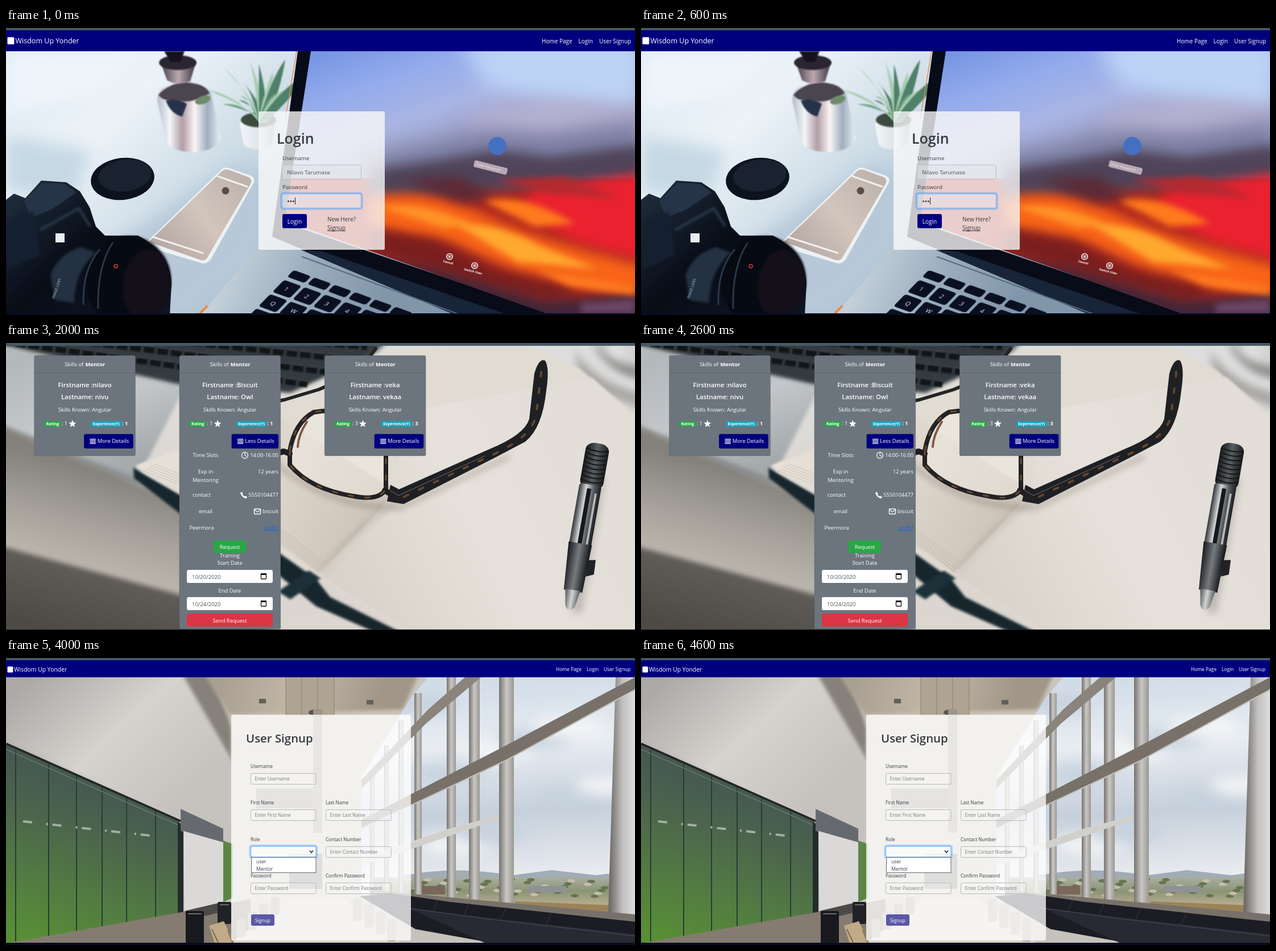
Write an HTML page with a canvas that moves like this. It is 1106 px wide and 506 px high and loops after 5000 ms.

```html
<!DOCTYPE html>
<html lang="en">
<head>
<meta charset="utf-8">
<title>Mentoring portal tour</title>
<style>
html, body { margin: 0; width: 100%; height: 100%; overflow: hidden; background: #000; }
canvas { display: block; width: 1106px; height: 506px; }
</style>
</head>
<body>
<canvas id="stage" width="1106" height="506"></canvas>
<script>
const W = 1106, H = 506, HOLD = 1000;
const NAVY = '#00007f', INK = '#343a40', GREY = '#6c757d', BLUE = '#80bdff';
const APP = 'Wisdom Up Yonder';
const MENTORS = [
  { first: 'nilavo', last: 'nivu', skill: 'Angular', rate: 1, exp: 1 },
  { first: 'Biscuit', last: 'Owl', skill: 'Angular', rate: 1, exp: 1 },
  { first: 'veka', last: 'vekaa', skill: 'Angular', rate: 3, exp: 3 }
];
let g;

// Drawing helpers
function fill(d, color) { g.fillStyle = color; g.fill(new Path2D(d)); }
function line(d, color, width = 1) {
  g.strokeStyle = color; g.lineWidth = width; g.stroke(new Path2D(d));
}
function rect(x, y, w, h, color) { g.fillStyle = color; g.fillRect(x, y, w, h); }
function box(x, y, w, h, r, color, edge, width = 1) {
  g.beginPath(); g.roundRect(x, y, w, h, r);
  if (color) { g.fillStyle = color; g.fill(); }
  if (edge) { g.strokeStyle = edge; g.lineWidth = width; g.stroke(); }
}
function oval(x, y, rx, ry, color, turn = 0) {
  g.beginPath(); g.ellipse(x, y, rx, ry, turn, 0, 7);
  g.fillStyle = color; g.fill();
}
function ramp(x0, y0, x1, y1, ...colors) {
  const r = g.createLinearGradient(x0, y0, x1, y1);
  colors.forEach((c, i) => r.addColorStop(i / (colors.length - 1), c));
  return r;
}
function soft(radius, draw) {
  g.save(); g.filter = `blur(${radius}px)`; draw(); g.restore();
}
function inside(d, draw) { g.save(); g.clip(new Path2D(d)); draw(); g.restore(); }
function text(s, x, y, size, color = '#fff', align = 'left', weight = 400) {
  g.font = `${weight} ${size}px "Open Sans", "Noto Sans", sans-serif`;
  g.textAlign = align; g.fillStyle = color; g.fillText(s, x, y);
}
function chevron(x, y) { line(`M${x - 3} ${y - 2}l3 3.5l3-3.5`, '#343a40', 1.8); }
function focus(x, y, w, h, color) {
  box(x - 1.5, y - 1.5, w + 3, h + 3, 4, null, 'rgba(0,123,255,.3)', 3);
  box(x, y, w, h, 3, color, BLUE, 1.3);
}

// Shared page parts
function frameEdges(top, bottom = 503) {
  rect(0, 0, W, top, '#455a64');
  rect(0, bottom, W, H - bottom, '#080d20');
}
function nav(top, bottom, size, x, base) {
  rect(0, top, W, bottom - top, NAVY);
  box(2.5, base - size * .86, size * .95, size, 1.5, '#fff');
  text(APP, x, base, size);
}
function links(size, base, ...xs) {
  ['Home Page', 'Login', 'User Signup'].forEach((s, i) => text(s, xs[i], base, size));
}
function welcome(size, y1, size2, y2, ruleY, x0, x1) {
  text('Welcome to Wisdom up Yonder!', 553, y1, size, '#fff', 'center', 300);
  text('Select any Skill from the below Drop-Box', 554, y2, size2, '#fff', 'center', 600);
  rect(x0, ruleY, x1 - x0, 1, 'rgba(0,0,0,.12)');
}
function star(x, y, r) {
  g.beginPath();
  for (let i = 0; i < 10; i++) {
    const a = i * Math.PI / 5 - Math.PI / 2, q = i % 2 ? r * .42 : r;
    g.lineTo(x + q * Math.cos(a), y + q * Math.sin(a));
  }
  g.fillStyle = '#fff'; g.fill();
}
function mentorCard(x, y, scale, m, h = 187, label = 'More Details') {
  g.save(); g.translate(x, y); g.scale(scale, scale);
  box(0, 0, 189, h, 3, GREY, 'rgba(0,0,0,.12)');
  rect(0, 32, 189, 1, 'rgba(0,0,0,.15)');
  text('Skills of', 57, 20, 10);
  text('Mentor', 95.5, 20, 10, '#fff', 'left', 700);
  text('Firstname :' + m.first, 94.5, 59, 12, '#fff', 'center', 600);
  text('Lastname: ' + m.last, 94.5, 82, 12, '#fff', 'center', 600);
  text('Skills Known: ' + m.skill, 94.5, 105, 10, '#fff', 'center');
  box(19, 122.5, 31, 11, 2, '#28a745');
  text('Rating', 34.5, 131, 7.4, '#fff', 'center', 700);
  text(': ' + m.rate, 51.5, 131, 9.8);
  star(71.5, 128, 7.4);
  box(106, 122.5, 57, 11, 2, '#17a2b8');
  text('Experience(Y)', 134.5, 131, 7.4, '#fff', 'center', 700);
  text(': ' + m.exp, 164, 131, 9.8, '#fff', 'left', 700);
  if (label) {
    const left = label[0] === 'L' ? 97.5 : 93;
    box(left, 147, 185 - left, 27, 3, NAVY);
    for (let i = 0; i < 4; i++) rect(left + 11, 156 + i * 2.7, 11, 1.4, '#fff');
    text(label, left + 25, 164, 10);
  }
  g.restore();
}

// Photo backdrops
function phoneDesk() {
  rect(0, 0, W, H, ramp(0, 60, 420, 500, '#dfeaf3', '#ecf3f8', '#cbdae5', '#a6bbcb'));
  soft(14, () => {
    fill('M0 40H250L160 120L0 150Z', '#edf4fa');
    fill('M180 390L400 240L470 260L450 400L330 506H270Z', '#b7c9d8');
    fill('M0 190L150 215L120 300L0 290Z', '#c6d8e4');
  });
  // Vase
  soft(1.2, () => {
    fill('M266 128Q266 102 300 95Q345 92 361 116L378 195Q370 218 325 219Q285 216 281 198Z',
      ramp(266, 0, 376, 0, '#b4bccb', '#f3f6fa', '#b19ca5', '#fbf5f5', '#9fadbf', '#e4eaf0'));
    fill('M268 118Q285 97 318 96Q350 98 358 115Q330 134 300 128Q276 130 268 118Z', '#4b4550');
    fill('M281 128Q300 122 318 134L310 156Q290 152 281 128Z', '#26314a');
    fill('M272 60Q300 42 334 60L324 94Q299 102 283 92Z', ramp(272, 0, 334, 0, '#423a48', '#bcaab0', '#383242'));
    oval(302, 61, 33, 13, '#2a2530');
    fill('M278 41H314L306 60H290Z', '#15121c');
    oval(346, 127, 14, 7, '#6d8c68', -.3);
  });
  // Plant
  soft(1, () => {
    fill('M411 168Q440 145 474 160L468 204Q442 224 418 206Z', ramp(410, 0, 474, 0, '#f5f7f8', '#dfe6ea', '#97a7b0'));
    oval(444, 162, 31, 13, '#3d4a3f');
    for (let i = 0; i < 15; i++) {
      const a = -2.85 + i * .15, r = 74 + 38 * Math.sin(i * 1.9);
      const x = 452 + r * Math.cos(a), y = 156 + r * Math.sin(a);
      fill(`M445 165Q${448 + r * .45 * Math.cos(a)} ${140 + r * .5 * Math.sin(a)} ${x} ${y}Q${463 + r * .5 * Math.cos(a)} ${152 + r * .4 * Math.sin(a)} 458 165Z`,
        ['#6fa184', '#a9cdb0', '#4f8069'][i % 3]);
    }
  });
  // Laptop screen
  fill('M513 41H540L494 345L966 506H862L516 388L468 368Z', '#080b18');
  line('M511 41L491 160', '#e98350', 1.3);
  inside('M536 41H1106V503H950L666 402L490 340Z', () => {
    rect(470, 40, 640, 230, ramp(560, 40, 640, 270, '#7695e2', '#93abec', '#a9b5e4', '#9a9cc0'));
    rect(470, 265, 640, 241, '#b0291f');
    soft(18, () => {
      fill('M800 20H1120V150L960 130L840 100Z', '#bcd3f6');
      fill('M820 150L960 130L1120 140V200H820Z', '#b9b4d3');
      fill('M630 225L740 205L850 178L950 186L1120 160V240L640 270Z', '#7c7fa3');
    });
    soft(10, () => {
      fill('M640 250L760 232L860 215L960 226L1120 205V268L930 282L640 300Z', '#4f4459');
      fill('M930 285L1120 255V410L1010 380L900 320Z', '#ea2230');
      fill('M640 300Q740 280 830 325T1120 420V478L900 430L780 378L640 352Z', '#f86418');
      fill('M700 268L800 262L860 300L800 308Z', '#5c2a35');
      fill('M640 352L760 374L860 425L1010 462L960 482L800 440L640 392Z', '#7a1f1e');
      fill('M640 402L760 425L950 480L1120 468V530H640Z', '#402638');
    });
    soft(6, () => {
      fill('M655 315Q740 305 820 348L770 352Z', '#ff9428');
      fill('M790 345Q870 345 940 385L1040 425L900 412Z', '#ffa92f');
      fill('M840 305Q910 290 1000 345L930 350Z', '#ff7a1c');
      fill('M860 268L980 262L1080 300L960 292Z', '#b32b31');
      fill('M930 425L1106 455V470L990 455Z', '#ff7a20');
      fill('M1010 485L1106 478V503H1010Z', '#6b4766');
    });
    oval(864, 208, 16, 16, '#476fc0');
    g.save(); g.translate(852, 246); g.rotate(.25);
    box(-30, -6, 60, 12, 3, 'rgba(225,205,215,.72)');
    text('Enter Password', -26, 2.5, 6, 'rgba(255,255,255,.85)');
    g.restore();
    [[780, 403, 'Cancel'], [824, 419, 'Switch User']].forEach(([x, y, s]) => {
      oval(x, y, 5.5, 5.5, 'rgba(255,255,255,.3)');
      g.beginPath(); g.arc(x, y, 5.5, 0, 7); g.strokeStyle = '#fff'; g.lineWidth = 1.2; g.stroke();
      line(`M${x - 2} ${y - 2}l4 4m0-4l-4 4`, '#fff');
      g.save(); g.translate(x - 3, y + 12); g.rotate(.25);
      text(s, 0, 0, 5.5, '#fff', 'center', 700); g.restore();
    });
  });
  // Laptop deck
  fill('M438 391H516L840 506H342Z', ramp(400, 400, 650, 506, '#c3d0da', '#9aacbc', '#8296aa'));
  fill('M518 391L556 394L884 506H790Z', '#182438');
  line('M520 403L800 506', '#536a83', 2);
  g.save(); g.transform(.94, .34, -.7, .72, 506, 427);
  ['', '12345678', 'QWERTYUI', 'ASDFGHJK'].forEach((row, j) => {
    for (let i = 0; i < 8; i++) {
      const y = j ? j * 35 - 11 : 0;
      box(i * 38, y, 32, j ? 29 : 16, 4, '#0a1020', '#26374e');
      if (j) text(row[i], i * 38 + 12, y + 19, 11, '#dbe5ee');
    }
  });
  g.restore();
  // Phone, lens cap and camera
  fill('M246 379L377 251Q385 243 395 248L430 260Q440 265 435 274L360 408Q352 418 342 414L255 388Q245 385 246 379Z', '#edf1f3');
  fill('M251 377L379 253Q386 247 394 251L427 263Q434 267 430 275L354 405Q350 411 342 409Z',
    ramp(270, 390, 420, 270, '#b5a7a3', '#d2c5bc', '#bfb3ae'));
  line('M257 368L347 397M371 261L425 280', '#f2f0ec', 3);
  oval(386, 287, 6.5, 6.5, '#5c4b47');
  oval(205, 266, 56, 37, '#0c131f', -.12);
  oval(209, 260, 47, 28, '#192330', -.12);
  fill('M0 303L14 292L34 300L62 269L106 272L130 288L147 316L158 350L174 366L232 366Q288 395 291 450L288 506H0Z',
    ramp(20, 280, 230, 506, '#1f2c3c', '#080d17', '#0e1624'));
  fill('M32 305L64 273L104 275L124 290L80 320L44 334Z', '#253446');
  soft(2, () => {
    fill('M2 340L48 324L60 400L2 426Z', '#142030');
    line('M60 356L128 318L148 350', '#2c3d50', 4);
    oval(215, 446, 74, 79, '#060a12', .2);
    oval(247, 452, 42, 62, '#14101a', .12);
    fill('M78 435Q92 398 132 386L158 396Q120 430 120 485L86 480Z', '#233142');
  });
  line('M165 390Q134 425 136 488M188 378Q160 420 162 495', '#29384a', 3);
  box(87, 362, 16, 16, 0, '#e8edf0');
  g.save(); g.translate(85, 478); g.rotate(-1.25); text('IMAGE LENS', 0, 0, 6.5, '#bac8d4'); g.restore();
  g.beginPath(); g.arc(193, 420, 3, 0, 7); g.strokeStyle = '#d3432e'; g.lineWidth = 1.5; g.stroke();
  line('M341 503L354 490', '#ef8844', 4);
}

function glassesDesk(dy) {
  g.save(); g.translate(0, dy);
  rect(0, 0, W, 730, ramp(500, 40, 520, 720, '#d8d9d7', '#dfdedb', '#dad6d0', '#dbd6cf'));
  soft(7, () => {
    fill('M770 20H1120V330L890 200L740 180Z', '#dddedd');
    fill('M1000 225Q1040 285 1120 300V330L1010 285Z', '#a9a7a3');
    fill('M1028 20L1036 225Q1066 268 1120 272V20Z', ramp(1028, 0, 1106, 0, '#aaacac', '#e2e3e3', '#cfcfcd'));
    fill('M1036 215Q1066 250 1120 254V276Q1060 270 1036 215Z', '#8f8f8d');
  });
  soft(3, () => {
    fill('M-10 30H60V130L700 180L640 245L310 298L238 440L300 506L-10 362Z',
      ramp(0, 120, 140, 460, '#c2c6c7', '#b3b8ba', '#c3c7c9', '#a4a9ac'));
    fill('M57 30H792L755 182L640 178L57 104Z', ramp(60, 40, 650, 190, '#202325', '#101314', '#181c1e'));
    fill('M55 103L640 178L632 190L52 122Z', '#a3a6a5');
    fill('M50 135L690 187L640 235L500 300L300 284L-10 214V152Z', '#343b40');
  });
  g.save(); g.setLineDash([19, 5]); g.filter = 'blur(1.5px)';
  for (let i = 0; i < 5; i++) {
    line(`M${40 - i * 12} ${145 + i * 16}L${670 - i * 35} ${197 + i * 22}`, '#101517', 11);
    line(`M${40 - i * 12} ${139 + i * 16}L${670 - i * 35} ${191 + i * 22}`, '#606a6f', 1);
  }
  g.restore();
  // Table edge, shaded below the laptop
  soft(4, () => {
    fill('M-10 358L250 470L330 510V690L-10 580Z', ramp(150, 435, 105, 610, '#85827c', '#a5a19a', '#bdb8af'));
    fill('M-10 570L310 657L500 730H-10Z', ramp(150, 620, 120, 730, '#5f5b56', '#4d4a46'));
    line('M-10 359L235 458', '#6f6f6d', 4);
  });
  // Notebook
  soft(2, () => {
    fill('M224 432L310 482L483 584L545 628L570 660L730 740H690L545 676L478 620L305 512L225 450Z', '#17262d');
    fill('M478 650L540 608L560 622L500 664Z', '#1d3039');
    fill('M228 430L310 392L480 330L650 232L880 197L1010 258L1120 350V740H735L562 633L470 570L240 440Z', '#e0dbd3');
    fill('M228 428L480 342L690 475L550 618L470 560Z', ramp(280, 400, 610, 560, '#e6e0d7', '#ded7cd', '#cec6bb'));
  });
  soft(2, () => fill('M690 335L1030 273L1120 358V740H740L556 626Q620 548 690 470Z',
    ramp(570, 600, 1040, 350, '#d8d2c9', '#e6e2db', '#e2ddd6')));
  for (let i = 0; i < 5; i++)
    line(`M${240 + i * 5} ${437 - i * 3}Q420 ${500 - i * 4} ${550 + i * 3} ${615 - i * 4}`, 'rgba(130,112,95,.25)');
  soft(6, () => line('M555 618Q605 547 704 476', 'rgba(96,82,70,.2)', 8));
  // Glasses
  const lens1 = 'M322 305Q306 335 310 367Q345 407 426 417Q449 414 449 398Q448 345 431 325Q391 293 322 305Z';
  const lens2 = 'M499 402Q508 352 541 334Q593 325 638 346Q661 360 668 409L668 469Q657 491 611 482Q535 470 499 427Z';
  soft(6, () => line('M345 412Q400 432 470 421Q570 505 693 502L885 412', 'rgba(72,58,48,.28)', 8));
  fill(lens1, 'rgba(240,238,234,.35)');
  fill(lens2, 'rgba(244,240,233,.45)');
  g.lineJoin = g.lineCap = 'round';
  line('M337 361Q420 325 490 312L550 294Q620 266 650 222', '#252424', 6);
  line(lens1, '#222224', 7); line(lens2, '#222224', 8);
  line('M449 400Q468 411 488 403L499 407M666 472L692 488', '#1e1e20', 10);
  fill('M676 462L691 470L848 400Q912 374 920 346L929 266Q937 238 948 243Q956 256 950 296Q943 362 913 386L860 414L699 496L670 491Z', '#1e2023');
  g.save(); g.setLineDash([8, 21]); g.globalAlpha = .65;
  line('M700 483L860 407Q924 377 932 340L942 257', '#8c5931', 4);
  line(lens2, '#916039', 3); line(lens1, '#715039', 2);
  g.restore();
  line('M675 472L690 481L842 411', 'rgba(230,230,230,.4)', 1);
  line('M529 351Q514 374 513 395', '#7c5c43', 4);
  // Pen
  soft(7, () => line('M1042 455L1004 680', 'rgba(65,55,50,.25)', 18));
  g.save(); g.translate(1041, 387); g.rotate(.173); g.scale(1.22, 1);
  box(-16, 2, 34, 81, 13, ramp(-16, 0, 18, 0, '#16191c', '#575d60', '#17191c'));
  for (let i = 0; i < 8; i++) line(`M-14 ${13 + i * 8}Q2 ${19 + i * 8} 16 ${13 + i * 8}`, '#121416', 2);
  box(-16, 76, 32, 117, 4, ramp(-16, 0, 16, 0, '#303438', '#d2d4d4', '#5b6064', '#191c20'));
  rect(-4, 83, 6, 108, '#15191d');
  rect(8, 90, 3, 95, '#b6b9ba');
  fill('M-17 181H17L15 266H-12Z', ramp(-17, 0, 17, 0, '#15171b', '#777b7e', '#101216'));
  fill('M15 208L26 205L27 231L16 237Z', '#202226');
  fill('M-10 264H12L8 293Q0 307-6 293Z', ramp(-10, 0, 12, 0, '#4c5053', '#d3d5d4', '#55595c'));
  g.restore();
  g.restore();
}

function meetingRoom() {
  rect(0, 0, W, H, ramp(0, 34, 300, 500, '#a8a49f', '#ccc9c5', '#c5c1bb'));
  soft(3, () => {
    fill('M0 30H310L395 190V330L300 282L0 147Z', ramp(40, 40, 270, 290, '#aca9a6', '#d6d3cf', '#c5c2be'));
    fill('M312 30H362L400 130V185Z', '#86817a');
    fill('M348 30H725L684 120L396 104Z', ramp(380, 34, 650, 100, '#aaa092', '#c3b8a8', '#a19687'));
    fill('M396 100L710 90L640 230V430H396Z', '#cbc3b6');
  });
  fill('M492 34H577V102H492Z', '#afa493');
  line('M492 34V102M520 34V102M548 34V102M577 34V102', '#8a8073');
  [[445, 72], [634, 74]].forEach(([x, y]) => rect(x, y, 12, 8, '#64605a'));
  oval(542, 96, 10, 5, '#59544d');
  rect(540, 90, 16, 218, '#9c958c'); rect(440, 230, 100, 35, '#918b82');
  // Green panels and left wall
  fill('M0 153L304 288L312 455L0 506Z', ramp(160, 180, 50, 500, '#425452', '#4b634d', '#527943', '#588f35'));
  [17, 75, 124, 169, 212, 263].forEach(x => line(`M${x} ${155 + x * .43}V${505 - x * .16}`, '#293b36', 2));
  line('M0 151L308 288', '#222727', 4); line('M0 161L304 295', '#7b8b7b', 1);
  g.save(); g.setLineDash([16, 25, 3, 8]); line('M30 288L270 315', '#a2afa1', 4); g.restore();
  fill('M302 288L312 296V500H302Z', '#242c2c');
  fill('M307 266L382 301V325L307 305Z', '#666a70');
  fill('M312 305L382 325V440L314 447Z', '#dad9d8');
  fill('M382 322L399 328V423L382 430Z', '#5d8545');
  fill('M0 503L315 447L430 425V506Z', '#857b70');
  fill('M314 446L382 430V447L320 462Z', '#4c4a49');
  box(316, 446, 32, 58, 4, '#17191c'); box(372, 430, 24, 39, 3, '#202225');
  line('M320 451H344M376 435H392', '#696b6c', 2);
  // Windows
  const glass = 'M712 70L742 34H1106V460L705 416H625V210Z';
  fill(glass, ramp(850, 34, 870, 390, '#d1dce8', '#e8edf2', '#c6d0dc', '#e9ecef'));
  inside(glass, () => {
    soft(12, () => {
      for (let i = 0; i < 9; i++) oval(730 + (i * 137) % 350, 80 + (i * 83) % 270, 65, 17, i % 2 ? '#f3f5f6' : '#c6d2de');
    });
    fill('M700 383Q790 366 890 383L960 374L1038 383L1106 374V400H700Z', '#a2acb7');
    rect(640, 387, 470, 80, ramp(0, 387, 0, 460, '#a9ae9e', '#8b9476', '#baae91', '#9b8b6b'));
    for (let i = 0; i < 46; i++) oval(705 + (i * 53) % 365, 390 + (i * 17) % 31, 7, 3, i % 3 ? '#65754f' : '#c5bdab');
    rect(730, 402, 42, 15, '#79675b'); rect(920, 402, 65, 11, '#8f9295');
    fill('M895 429L1070 436V462H895Z', '#9b8359');
  });
  // Frame bars, far to near
  [[640, 8, 200], [665, 8, 154], [690, 9, 110], [718, 13, 62], [775, 16, 34], [814, 19, 34], [867, 26, 34]].forEach(([x, w, y]) => {
    rect(x, y, w, 440 - y, ramp(x, 0, x + w, 0, '#77726d', '#c9c8c5', '#9b9792'));
  });
  fill('M1072 34H1106V475H1058Z', ramp(1062, 0, 1106, 0, '#706c68', '#c1c0bf', '#dedddb'));
  fill('M625 285L868 160L1106 34V55L880 180L625 300Z', '#77716a');
  line('M625 301L880 180L1106 56', '#c3bfb9', 2);
  fill('M625 215L742 91L807 34H835L738 116L625 230Z', '#8a847c');
  fill('M625 354L715 323L775 302L867 277V284L715 336L625 367Z', '#d2d0cd');
  fill('M640 409L705 415L1106 452V466L640 424Z', '#77716a');
  // Furniture
  fill('M390 506L500 424H593L700 506Z', '#d9d1c6');
  rect(498, 345, 58, 62, '#75716c');
  fill('M622 420L680 415L780 430L1106 465V506H875L720 478Z', '#1b1c24');
  fill('M705 440L840 457L1106 487V506H850Z', '#282933');
  line('M700 440L845 460L1106 490', '#4e4d55');
  [760, 815, 880, 960].forEach(x => line(`M${x} ${426 + (x - 760) * .11}l-12 25`, '#3a3941', 1));
  for (let i = 0; i < 4; i++) {
    box(405 + i * 20, 460 - i * 13, 16, 32, 4, '#aaa094');
    box(610 + i * 20, 424 + i * 12, 16, 40, 4, '#b3aa9f');
  }
  fill('M357 472L383 464L402 503H367Z', '#c1aa88');
  line('M362 478L375 506M390 480L400 506', '#806c52', 2);
}

// Pages
function loginPage() {
  phoneDesk(); frameEdges(4); nav(4, 41, 12.5, 16.5, 27);
  links(10, 27, 942, 1006.5, 1043);
  box(444, 147, 222, 244, 2, 'rgba(250,250,250,.79)');
  text('Login', 476, 204, 25, INK, 'left', 600);
  text('Username', 486, 233, 9.8, INK);
  box(485.5, 241.5, 139, 25, 3, 'rgba(225,227,231,.5)', '#b9bfc6');
  text('Nilavo Tarumase', 494, 258, 9.8, '#495057');
  text('Password', 486, 284, 9.8, INK);
  focus(485.5, 292.5, 139, 25, 'rgba(235,236,240,.4)');
  for (let i = 0; i < 3; i++) oval(496.5 + i * 4.4, 305.5, 1.5, 1.5, '#343a40');
  rect(508, 299, 1, 12, '#222');
  box(486, 328, 43, 25, 3, NAVY);
  text('Login', 507.5, 345, 10, '#fff', 'center');
  text('New Here?', 565, 341, 10, INK);
  text('Signup', 565, 356, 10, INK);
  rect(565, 357, 32, 1, INK);
}
function skillsPage() {
  glassesDesk(0); frameEdges(4, 502); nav(4, 42, 12.5, 16.5, 28);
  box(937, 18, 13, 9, 1, null, '#fff', 1.4); rect(940, 29, 6, 1.4, '#fff');
  box(947, 21, 5, 9, 1, NAVY, '#fff', 1.2);
  text('Portal: user', 955, 27, 10);
  oval(1024.5, 20.5, 3, 3, '#fff'); fill('M1019 30Q1019 25 1024.5 25T1030 30Z', '#fff');
  text('user', 1033, 27, 10); text('Logout', 1063, 27, 10);
  welcome(45, 133, 14.9, 162, 176, 21, 1085);
  box(21.5, 187.5, 1064, 24, 3, '#fff', '#ced4da');
  text('Angular', 32, 204, 10.1, '#495057'); chevron(1077, 199);
  MENTORS.forEach((m, i) => mentorCard(52.5 + i * 271.7, 244, 1, m));
}
function dateField(y, value) {
  box(318, y, 151, 23, 3, '#fff');
  text(value, 327, y + 16, 9.5, '#495057');
  box(448.5, y + 7, 9, 9, 1, null, '#111', 1.3); rect(448, y + 6, 10, 3, '#111');
}
function detailsPage() {
  glassesDesk(-212); frameEdges(5, 505);
  MENTORS.forEach((m, i) => {
    const open = i === 1;
    mentorCard(49.5 + i * 255.3, 22, .942, m, open ? 512 : 188, open ? 'Less Details' : undefined);
  });
  const row = (label, x, y, value) => {
    text(label, x, y, 9.4, '#fff', 'center');
    if (value) text(value, 479, y, 9.2, '#fff', 'right');
  };
  row('Time Slots', 351, 201, '14:00-16:00');
  row('Exp in', 351, 230, '12 years'); row('Mentoring', 351, 245);
  row('contact', 344, 271, '5550104477');
  row('email', 351, 300, 'biscuit'); row('Peermora', 344, 329);
  g.beginPath(); g.arc(420, 198, 5.5, 0, 7); g.strokeStyle = '#fff'; g.lineWidth = 1.3; g.stroke();
  line('M420 194V198L423 200', '#fff', 1.2);
  line('M413.5 264Q415 271 422.5 273', '#fff', 2.5);
  line('M413 263.5L415.5 266.5M420 270.5L423 273', '#fff', 3.5);
  box(436.5, 292.5, 11, 9, 1, null, '#fff', 1.4); line('M437 294L442 298L447 294', '#fff', 1.3);
  text('asdfsf', 479, 329, 9.4, '#1768df', 'right'); rect(451, 330, 28, 1, '#1768df');
  box(365, 348, 57, 22, 3, '#28a745');
  [['Request', 363], ['Training', 378], ['Start Date', 391], ['End Date', 440]].forEach(([s, y]) => row(s, 393.5, y));
  dateField(400, '10/20/2020'); dateField(448, '10/24/2020');
  box(318, 477, 151, 23, 3, '#dc3545'); row('Send Request', 393.5, 493);
  rect(0, 505, W, 1, '#171b20');
}
function skillListPage() {
  glassesDesk(-7); rect(0, 0, W, 7, '#455a64');
  nav(7, 42, 11.8, 15, 30); links(9.4, 29, 953, 1013, 1047);
  welcome(42.4, 126, 13.9, 153, 166, 20, 1090);
  mentorCard(49.5, 231, .942, { first: 'veka', last: 'vekaa', skill: 'React', rate: 4, exp: 4 }, 150, '');
  focus(20.5, 177.5, 1069, 23, '#fff');
  text('React', 31, 193, 9.4, '#495057'); chevron(1082, 189);
  g.save(); g.shadowColor = 'rgba(0,0,0,.35)'; g.shadowBlur = 4; g.shadowOffsetY = 1;
  rect(20, 202, 1070, 112, '#fff'); g.restore();
  g.strokeStyle = '#8b9096'; g.lineWidth = 1; g.strokeRect(20.5, 201.5, 1069, 112);
  const skills = ['Please select your Skill', 'Angular', 'JWT', 'HIbernate', 'React', 'ZLK', 'Machine Learning', 'Artificial Intelligence'];
  skills.forEach((s, i) => {
    if (i === 5) rect(21, 272, 1068, 14, '#1e90ff');
    text(s, 31, 212.5 + i * 14, 9.3, i === 5 ? '#fff' : i ? '#495057' : '#777');
  });
}
function signupPage() {
  meetingRoom(); frameEdges(4, 502); nav(4, 34, 10.4, 14, 24);
  links(8.4, 23, 967, 1021, 1051);
  box(396, 100, 316, 398, 2, 'rgba(255,255,255,.77)');
  text('User Signup', 422, 149, 20.4, INK, 'left', 600);
  const field = (label, x, y) => {
    text(label, x, y - 9, 8.1, INK);
    box(x + .5, y + .5, 114.5, 19, 2, 'rgba(255,255,255,.12)', '#b5b8bc');
    text('Enter ' + label, x + 7.5, y + 12.5, 8.05, '#747b82');
  };
  field('Username', 430, 203);
  field('First Name', 430, 267); field('Last Name', 562, 267);
  field('Contact Number', 562, 332);
  field('Password', 430, 396); field('Confirm Password', 562, 396);
  text('Role', 430, 323, 8.1, INK);
  focus(430.5, 332, 114.5, 19, 'rgba(255,255,255,.65)'); chevron(537, 341.5);
  rect(431, 351, 114, 28, '#fff');
  g.strokeStyle = '#626970'; g.lineWidth = 1; g.strokeRect(431.5, 351.5, 113.5, 27);
  text('user', 440, 362, 8.5, '#343a55'); text('Mentor', 440, 375, 8.5, '#343a55');
  box(431, 452, 41, 20, 3, '#5b58a7');
  text('Signup', 451.5, 465.5, 8.5, '#fff', 'center');
}

// Each page is painted once, then shown for its share of the loop
const pages = [loginPage, skillsPage, detailsPage, skillListPage, signupPage].map(paint => {
  const c = document.createElement('canvas');
  c.width = W; c.height = H;
  g = c.getContext('2d');
  paint();
  return c;
});
const view = document.getElementById('stage').getContext('2d');
const start = performance.now();
function tick() {
  const t = (performance.now() - start) % (HOLD * pages.length);
  view.drawImage(pages[Math.floor(t / HOLD)], 0, 0);
  requestAnimationFrame(tick);
}
tick();
</script>
</body>
</html>
```
